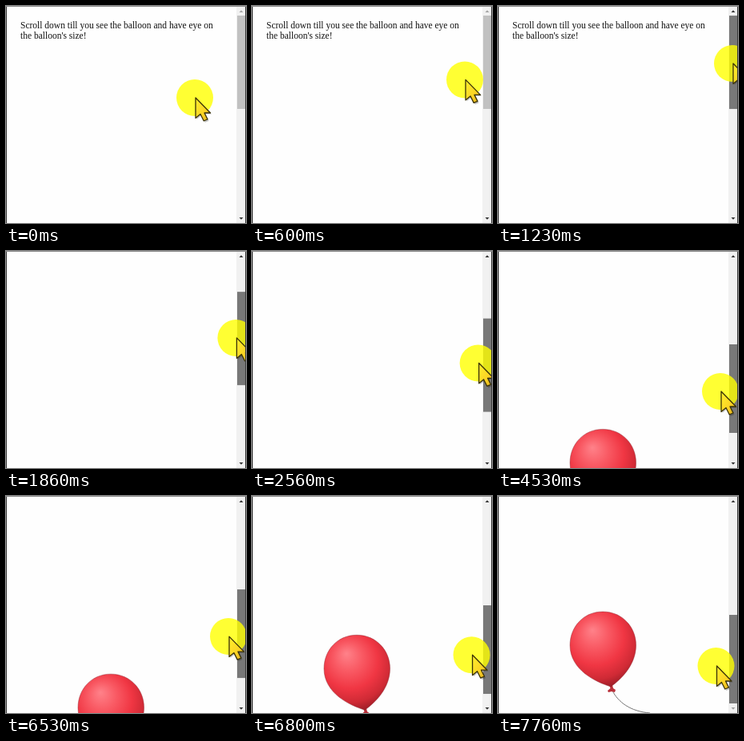
These frames come from a looping animation (300 by 272 pixels, 8000 ms). An HTML page:

```html
<!DOCTYPE html>
<html lang="en">
<head>
<meta charset="utf-8">
<title>Scroll to the balloon</title>
<style>
  html, body { margin: 0; height: 100%; overflow: hidden; background: #fefefe; }
  svg { display: block; width: 100%; height: 100%; }
  text { font: 11.5px "Liberation Serif", serif; fill: #111; }
</style>
</head>
<body>
<svg viewBox="0 0 300 272">
  <defs>
    <radialGradient id="skin" gradientUnits="userSpaceOnUse" cx="125" cy="183" r="59" fx="118" fy="168">
      <stop offset="0" stop-color="#ff828a"/>
      <stop offset=".3" stop-color="#f95a64"/>
      <stop offset=".6" stop-color="#f03643"/>
      <stop offset=".83" stop-color="#cf2a35"/>
      <stop offset="1" stop-color="#981c26"/>
    </radialGradient>
    <linearGradient id="gold" x2="1" y2="1">
      <stop offset="0" stop-color="#fff02c"/>
      <stop offset=".6" stop-color="#fbd324"/>
      <stop offset="1" stop-color="#d9a51c"/>
    </linearGradient>
  </defs>

  <rect width="300" height="272" fill="#fefefe"/>

  <g id="copy">
    <text x="18" y="28">Scroll down till you see the balloon and have eye on</text>
    <text x="18" y="41">the balloon's size!</text>
  </g>

  <g id="balloon">
    <path d="M143 244C150 258 165 270 190 272" fill="none" stroke="#666" stroke-width=".9"/>
    <path d="M139 237H143L144 241L147 243L146 246L142 245L138 246L137 244L140.5 241Z" fill="#b9303a"/>
    <path d="M131 145C155 145 172.500 164 172.500 187C172.500 211 155 229 141 239C122 233 90 218 90 187C90 164 107 145 131 145Z"
          fill="url(#skin)" stroke="#8f222d" stroke-opacity=".45"/>
  </g>

  <rect x="288" width="12" height="272" fill="#f1f1f1"/>
  <path id="up" d="M291.500 8L294 5.300L296.500 8Z"/>
  <path id="down" d="M291.500 265L294 267.700L296.500 265Z"/>
  <rect id="thumb" x="289" width="10"/>

  <g id="pointer">
    <circle r="23" fill="#ff0" opacity=".8"/>
    <path d="M1 0V25.500L7 20.500L11.200 29.500L16 27.500L12 19H19.500Z" transform="translate(1.5 1.5)" opacity=".22"/>
    <path d="M1 0V25.500L7 20.500L11.200 29L16 27L12 19H19.500Z" fill="url(#gold)" stroke="#3a3208" stroke-width="1.3" stroke-linejoin="round"/>
  </g>

  <path d="M.5 272V0M299.500 272V0" stroke="#3c3c3c"/>
  <path d="M0 .5H300" stroke="#8c8c8c"/>
</svg>

<script>
const LOOP = 8000;
const TRACK_TOP = 12, THUMB_END = 149, GROW_TIME = 4200;
const SHORT_PAGE = 2.32, LONG_PAGE = 2.45; // page pixels per thumb pixel

const part = id => document.getElementById(id);
const [copy, balloon, thumb, pointer, up, down] =
  ["copy", "balloon", "thumb", "pointer", "up", "down"].map(part);

// Progress from 0 to 1 that slows towards its end.
function easeOut(time, start, end, power) {
  const u = Math.min(1, Math.max(0, (time - start) / (end - start)));
  return 1 - (1 - u) ** power;
}

const place = (el, x, y) => el.setAttribute("transform", `translate(${x} ${y})`);
const paint = (el, color) => el.setAttribute("fill", color);

function render(time) {
  const approach = easeOut(time, 400, 860, 1.3);
  const firstDrag = easeOut(time, 1230, 4060, 1.85);
  const nudge = easeOut(time, GROW_TIME, 4530, 1);
  const lastDrag = easeOut(time, 6530, 7330, 2.38);

  const top = TRACK_TOP + 105 * firstDrag + 32 * lastDrag;
  place(thumb, 0, top);
  thumb.setAttribute("height", time < GROW_TIME ? 117 : 111);
  paint(thumb, time < 800 ? "#c1c1c1" : time < 1060 ? "#a8a8a8" : "#787878");

  place(copy, 0, (TRACK_TOP - top) * SHORT_PAGE);
  place(balloon, 0, (THUMB_END - top) * LONG_PAGE);
  balloon.setAttribute("opacity", nudge);

  place(pointer,
    236 + 57 * approach - 15 * firstDrag - 5.5 * lastDrag,
    115 - 43 * approach + 99 * firstDrag + 5 * nudge + 37 * lastDrag);

  paint(up, time < 1230 ? "#a3a3a3" : "#333");
  paint(down, time < 7330 ? "#333" : "#a3a3a3");
}

const startTime = performance.now();

function tick() {
  render((performance.now() - startTime) % LOOP);
  requestAnimationFrame(tick);
}
tick();
</script>
</body>
</html>
```
